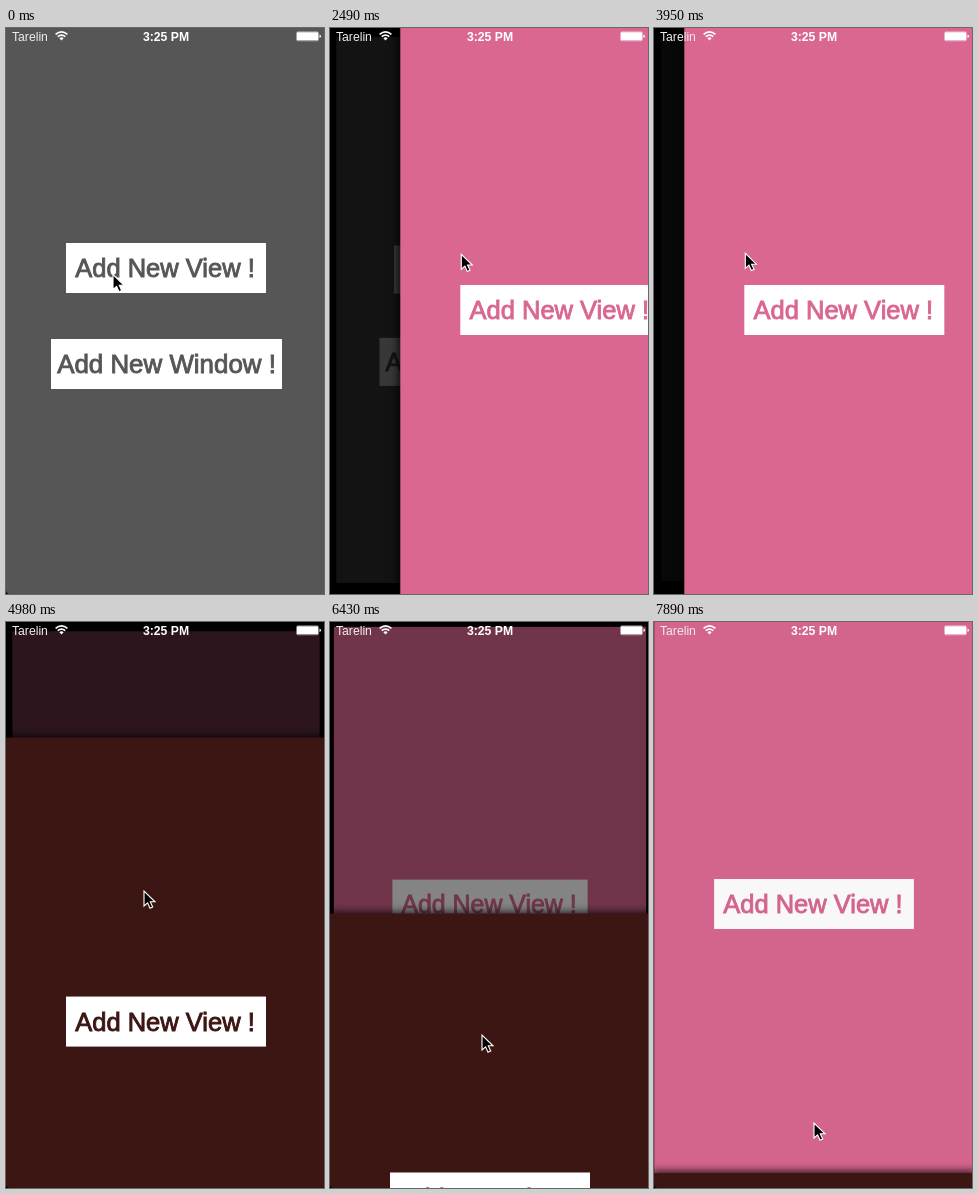
Animation, 318 px wide and 566 px high, one loop 8000 ms. Source, as an HTML page:

```html
<!DOCTYPE html>
<html lang="en">
<head>
<meta charset="utf-8">
<style>
html, body { margin: 0; width: 100%; height: 100%; overflow: hidden; background: #000; }
#stage { position: relative; width: 318px; height: 566px; overflow: hidden;
  font-family: "Liberation Sans", Arial, sans-serif; }
.view { position: absolute; left: 0; top: -2px; width: 320px; height: 568px;
  background: var(--c); color: var(--c); box-shadow: 0 0 8px 2px rgba(0, 0, 0, .8); }
.btn { position: absolute; left: 60px; top: 259px; width: 200px; height: 50px;
  background: #fff; font-size: 25.5px; line-height: 50px; text-align: center; text-indent: -2px;
  white-space: nowrap; -webkit-text-stroke: .9px currentColor; }
#root .btn { top: 217px; }
#root .wide { left: 45px; top: 313px; width: 231px; font-size: 25.9px; text-indent: 0; }
svg { position: absolute; left: 0; top: 0; }
</style>
</head>
<body>
<div id="stage">
  <div class="view" id="root" style="--c:#565656">
    <div class="btn">Add New View !</div>
    <div class="btn wide">Add New Window !</div>
  </div>
  <div class="view" id="pink" style="--c:#d96791"><div class="btn">Add New View !</div></div>
  <div class="view" id="brown" style="--c:#3c1613"><div class="btn">Add New View !</div></div>
  <svg width="318" height="566">
    <g fill="#fff" font-size="12.2">
      <text x="6" y="12.6" fill="#eee">Tarelin</text>
      <text x="160" y="12.6" text-anchor="middle" font-weight="bold">3:25 PM</text>
      <g fill="none" stroke="#fff" stroke-width="1.7">
        <path d="M49.6 6.4Q55.5 1.4 61.4 6.4M51.7 8.7Q55.5 5.4 59.3 8.7"/>
        <path d="M53.4 10.2Q55.5 8.4 57.6 10.2L55.5 12.4Z" fill="#fff" stroke="none"/>
        <rect x="290.5" y="3.8" width="22" height="9" rx="1.5" stroke-width=".8" opacity=".6"/>
      </g>
      <rect x="291" y="4.3" width="21" height="8" rx=".6"/>
      <path d="M313.5 6.6Q315 7 315 8.3T313.5 10Z"/>
    </g>
    <path d="M0 562.5Q.4 565.6 3.5 566H0Z"/>
    <path id="cursor" d="M0 0V15L3.6 11.8L6 17.2L8.7 16L6.3 10.8H11Z" stroke="#fff" stroke-width="1.1"/>
  </svg>
</div>
<script>
const LOOP = 8000, TICK = 207.4, W = 320, H = 568;
const [root, pink, brown, cursor] = ['root', 'pink', 'brown', 'cursor'].map(id => document.getElementById(id));

const ease = (t, from, to) => {
  const f = Math.min(1, Math.max(0, (t - from) / (to - from)));
  return f * f * (3 - 2 * f);
};
const slide = (t, start) => ease(t, start, start + 500);
const mix = (a, b, f) => a + (b - a) * f;

// pointer moves, timed in ticks
const moves = [
  { from: 4, to: 8, x: 51, y: 229 },
  { from: 9, to: 16, x: 255, y: 222 },    // drag pink aside
  { from: 16, to: 20, x: 61, y: 226 },    // and back
  { from: 20, to: 22, x: 138, y: 269 },   // tap its button
  { from: 24, to: 27, x: 146, y: 119.5 },
  { from: 28, to: 31, x: 152, y: 413 },   // drag brown down,
  { from: 31, to: 36, x: 143, y: 264.5 }, // up
  { from: 36, to: 38, x: 160, y: 501 }    // and away
];

const pointer = n => moves.reduce((p, m) => {
  const f = ease(n, m.from, m.to);
  return { x: mix(p.x, m.x, f), y: mix(p.y, m.y, f) };
}, { x: 107, y: 246.5 });

function place(view, x, y, cover) {
  view.style.transform = `translate(${x}px,${y}px) scale(${1 - .05 * cover})`;
  view.style.filter = cover ? `brightness(${1 - cover})` : 'none';
  view.style.visibility = x >= W || y >= H ? 'hidden' : 'visible';
}

function draw(now) {
  const n = Math.floor((now % LOOP) / TICK), t = n * TICK, p = pointer(n);
  let x = W * (1 - slide(t, 580)), y = H * (1 - slide(t, 4624));
  if (n > 8 && n <= 20) x = Math.max(0, p.x - 61);
  if (n > 27) y = mix(Math.max(0, p.y - 119.5), H, slide(t, 7468));

  place(root, 0, 0, 1 - x / W);
  place(pink, x, 0, 1 - y / H);
  place(brown, 0, y, 0);
  cursor.setAttribute('transform', `translate(${p.x} ${p.y})`);
  requestAnimationFrame(() => draw(performance.now() - begin));
}

const begin = performance.now();
draw(0);
</script>
</body>
</html>
```
